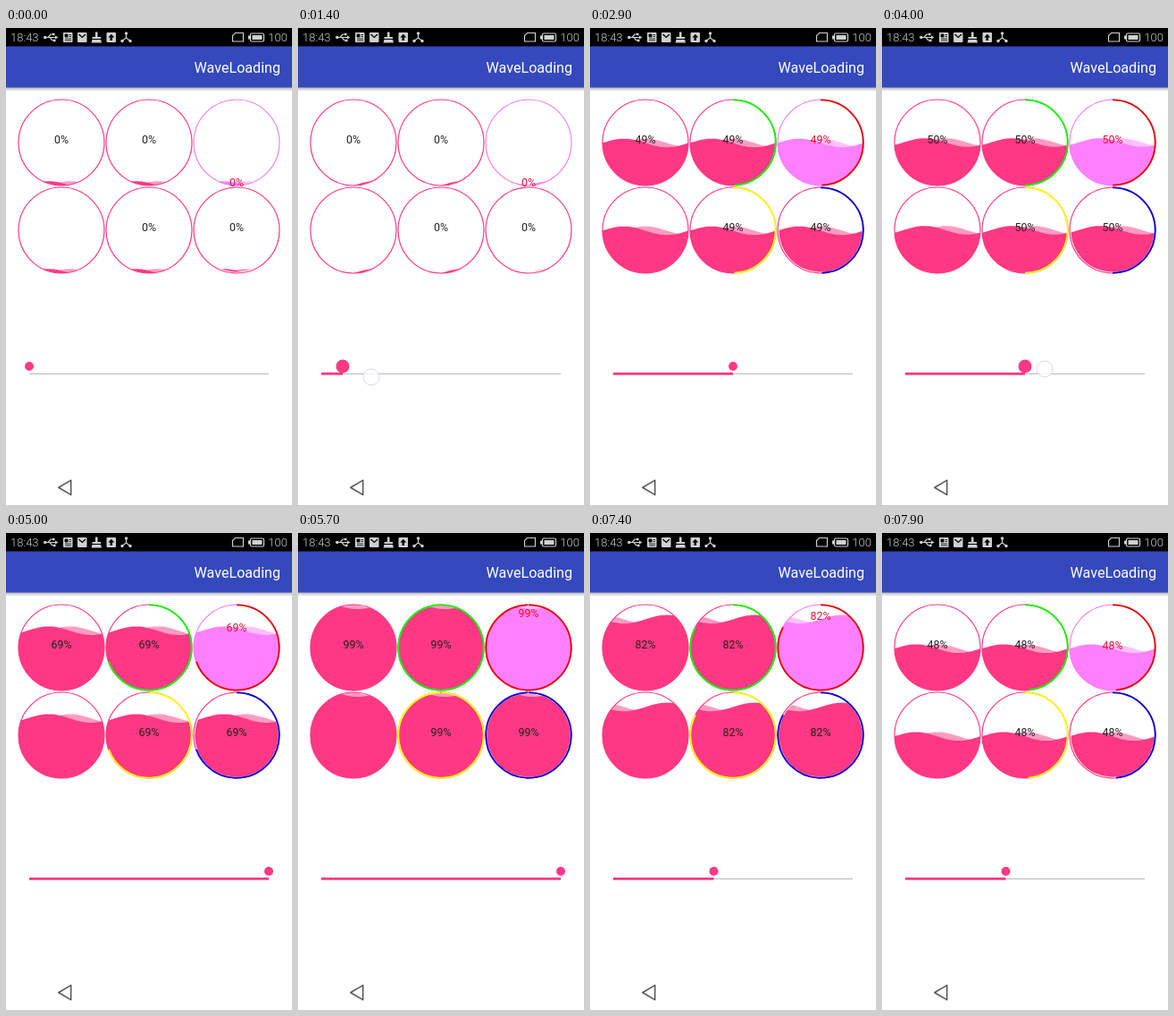
An HTML page for the animation above (8 s loop, 320 by 533 pixels).

```html
<!DOCTYPE html>
<html lang="en">
<head>
<meta charset="utf-8">
<title>WaveLoading</title>
<style>
  html, body { margin: 0; width: 100%; height: 100%; overflow: hidden; background: #fff; }
  svg { display: block; width: 100%; height: 100%; }
  text { font-family: Roboto, "Noto Sans", sans-serif; }
  .status { font-size: 13px; font-weight: 300; fill: #d0d0d0; }
  .icon { fill: #d0d0d0; }
  .line { fill: none; stroke: #d0d0d0; stroke-width: 1.2; }
  .value { font-size: 12.4px; text-anchor: middle; }
</style>
</head>
<body>
<svg id="stage" viewBox="0 0 320 533">
  <defs>
    <linearGradient id="shade" x1="0" y1="0" x2="0" y2="1">
      <stop offset="0" stop-color="#000" stop-opacity=".32"/>
      <stop offset="1" stop-color="#000" stop-opacity="0"/>
    </linearGradient>
  </defs>
  <rect width="320" height="533" fill="#fff"/>
  <rect y="66" width="320" height="5" fill="url(#shade)"/>
  <rect y="20" width="320" height="46.5" fill="#3549bd"/>
  <rect width="320" height="20.5" fill="#000"/>
  <text class="status" x="5" y="15">18:43</text>
  <text class="status" x="315" y="15" text-anchor="end">100</text>

  <!-- USB, news, mail, broom, upload, share -->
  <path class="line" d="M44 10.5H56M47 10.5L50 7H52M49 10.5L52 14H53"/>
  <path class="icon" d="M58.500 10.500L55 8.500V12.500ZM52 5.800h2.500v2.500H52ZM53 12.700h2.500v2.500H53Z"/>
  <circle class="icon" cx="43.800" cy="10.500" r="1.800"/>
  <rect class="icon" x="64" y="5" width="10.500" height="11" rx="1"/>
  <path d="M66 7h3v3h-3ZM70.500 7.500H73M70.500 9.500H73M66 12H73M66 14H73" fill="#000" stroke="#000" stroke-width=".8"/>
  <rect class="icon" x="80" y="5" width="10.500" height="11" rx="1"/>
  <path d="M81.500 7L85.300 10.500L89 7" fill="none" stroke="#000" stroke-width="1.200"/>
  <path class="icon" d="M100 4.500h2.500V10H106v2H96.500v-2H100ZM96.500 13H106L107 16.500H95.500Z"/>
  <rect class="icon" x="112.500" y="5" width="10.500" height="11" rx="1"/>
  <path d="M117.800 6.800L121.300 10.500H119V14h-2.500v-3.500H114.300Z"/>
  <path class="line" d="M134.500 6V11L130 14.500M134.500 11L139 14.500"/>
  <g class="icon"><circle cx="134.500" cy="6" r="1.700"/><circle cx="130" cy="14.500" r="1.700"/><circle cx="139" cy="14.500" r="1.700"/></g>

  <!-- SIM, battery -->
  <path class="line" d="M256.500 5.500H265.500V15H253.500V8.500Z"/>
  <rect class="line" x="273.500" y="6" width="15" height="9" rx="1.500"/>
  <path class="icon" d="M275.500 8H286.500V13H275.500ZM271 8.500H273V12.500H271Z"/>

  <text x="307" y="50" text-anchor="end" font-size="16.100" fill="#fff">WaveLoading</text>
  <g id="dials"></g>
  <path d="M26 386.500H294" stroke="#b9b9b9"/>
  <path id="track" stroke="#ff3883" stroke-width="2.800"/>
  <circle id="thumb" cy="378" fill="#ff3883"/>
  <circle id="touch" r="9" fill="#fff" fill-opacity=".8" stroke="#d9d6f0"/>
  <path d="M58.800 513.500L72.700 505.300V521.700Z" fill="none" stroke="#555" stroke-width="1.500" stroke-linejoin="round"/>
</svg>
<script>
const LOOP = 8000, STEP = 100, R = 48, PINK = '#ff3883';
const $ = id => document.getElementById(id);

// [time, x, y] of each finger drag
const drags = [
  [[1000, 27, 390], [1200, 42, 391], [1400, 82, 390], [1600, 116, 391], [1900, 156, 393], [2000, 160, 393]],
  [[3800, 162, 383], [4000, 182, 381], [4200, 235, 388], [4400, 290, 395], [4500, 312, 398], [4700, 312, 398]],
  [[6400, 306, 396], [6500, 300, 395], [6700, 260, 391], [6900, 210, 391], [7100, 158, 392], [7200, 136, 392]]
];
// [time, x]
const thumbPath = [
  [0, 26], [1200, 27], [1400, 50], [1600, 90], [1900, 152], [2000, 160],
  [4000, 160], [4200, 215], [4400, 275], [4500, 294],
  [6500, 294], [6600, 284], [6700, 264.5], [6900, 215], [7100, 162], [7200, 138.5]
];
// [release time, from, to]
const fills = [[2000, 0, .5], [4780, .5, 1], [7240, 1, .42]];

const dials = [
  { x: 62, y: 128, label: true },
  { x: 160, y: 128, label: true, arc: '#00ff00' },
  { x: 258, y: 128, label: true, arc: '#e60000', color: '#ff80ff', ring: '#ee82ee', floating: true },
  { x: 62, y: 226, cover: true },
  { x: 160, y: 226, label: true, arc: '#ffff00' },
  { x: 258, y: 226, label: true, arc: '#0000d8', inset: 1.5 }
];

function add(parent, tag, attrs) {
  const el = document.createElementNS('http://www.w3.org/2000/svg', tag);
  set(el, attrs);
  return parent.appendChild(el);
}

function set(el, attrs) {
  for (const k in attrs) el.setAttribute(k, attrs[k]);
}

function build(d, i) {
  const color = d.color || PINK;
  const clip = add(document.querySelector('defs'), 'clipPath', { id: 'clip' + i });
  add(clip, 'circle', { cx: d.x, cy: d.y, r: R - (d.inset || 0) });
  const g = add($('dials'), 'g', {});
  const water = add(g, 'g', { 'clip-path': `url(#clip${i})` });
  d.back = add(water, 'path', { fill: color, 'fill-opacity': .5 });
  d.front = add(water, 'path', { fill: color });
  add(g, 'circle', { cx: d.x, cy: d.y, r: R, fill: 'none', stroke: d.ring || PINK, 'stroke-width': 1.2 });
  if (d.arc) {
    d.arcEl = add(g, 'circle', {
      cx: d.x, cy: d.y, r: R - .3, fill: 'none', stroke: d.arc, 'stroke-width': 1.8,
      pathLength: 100, transform: `rotate(-90 ${d.x} ${d.y})`
    });
  }
  if (d.label) {
    d.text = add(g, 'text', { class: 'value', x: d.x, y: d.y + .5, fill: d.floating ? '#e0102c' : '#222' });
  }
}

// Linear interpolation of one column in a table of keys
function along(keys, t, col = 1) {
  const n = keys.findIndex(k => k[0] > t);
  if (n < 0) return keys[keys.length - 1][col];
  if (n === 0) return keys[0][col];
  const a = keys[n - 1], b = keys[n];
  return a[col] + (b[col] - a[col]) * (t - a[0]) / (b[0] - a[0]);
}

function levelAt(t) {
  let level = 0;
  for (const [start, from, to] of fills) {
    if (t < start) break;
    const left = 1 - Math.min(1, (t - start) / 1000);
    level = from + (to - from) * (1 - left * left);
  }
  return level;
}

function wave(d, level, crest) {
  const base = d.y + R - 2 * R * level;
  let path = '';
  for (let dx = -50; dx <= 50; dx += 2) {
    const y = base - 4.8 * Math.cos(2 * Math.PI * ((dx + R) / (2 * R) - crest));
    path += `${path ? 'L' : 'M'}${d.x + dx} ${y.toFixed(2)}`;
  }
  return `${path}V${d.y + 50}H${d.x - 50}Z`;
}

function draw(t) {
  const level = levelAt(t), crest = t / 1000 + .6;
  for (const d of dials) {
    d.back.setAttribute('d', wave(d, level, crest));
    d.front.setAttribute('d', wave(d, d.cover && level === 1 ? 1.06 : level, crest - .25));
    if (d.arcEl) set(d.arcEl, {
      'stroke-dasharray': `${level * 100} 200`,
      visibility: level > 0 ? 'visible' : 'hidden'
    });
    if (d.text) {
      d.text.textContent = Math.floor(level * 100 + 1e-6) + '%';
      if (d.floating) d.text.setAttribute('y', Math.max(93.5, 177.2 - 97 * level));
    }
  }

  const drag = drags.find(k => t >= k[0][0] && t <= k[k.length - 1][0]);
  const x = along(thumbPath, t);
  set($('thumb'), { cx: x, r: drag ? 7.5 : 5 });
  $('track').setAttribute('d', `M26 386.300H${x}`);
  $('touch').setAttribute('visibility', drag ? 'visible' : 'hidden');
  if (drag) set($('touch'), { cx: along(drag, t), cy: along(drag, t, 2) });
}

dials.forEach(build);
draw(0);
const begin = performance.now();
function tick() {
  const t = (performance.now() - begin) % LOOP;
  draw(Math.floor(t / STEP) * STEP);
  requestAnimationFrame(tick);
}
requestAnimationFrame(tick);
</script>
</body>
</html>
```
